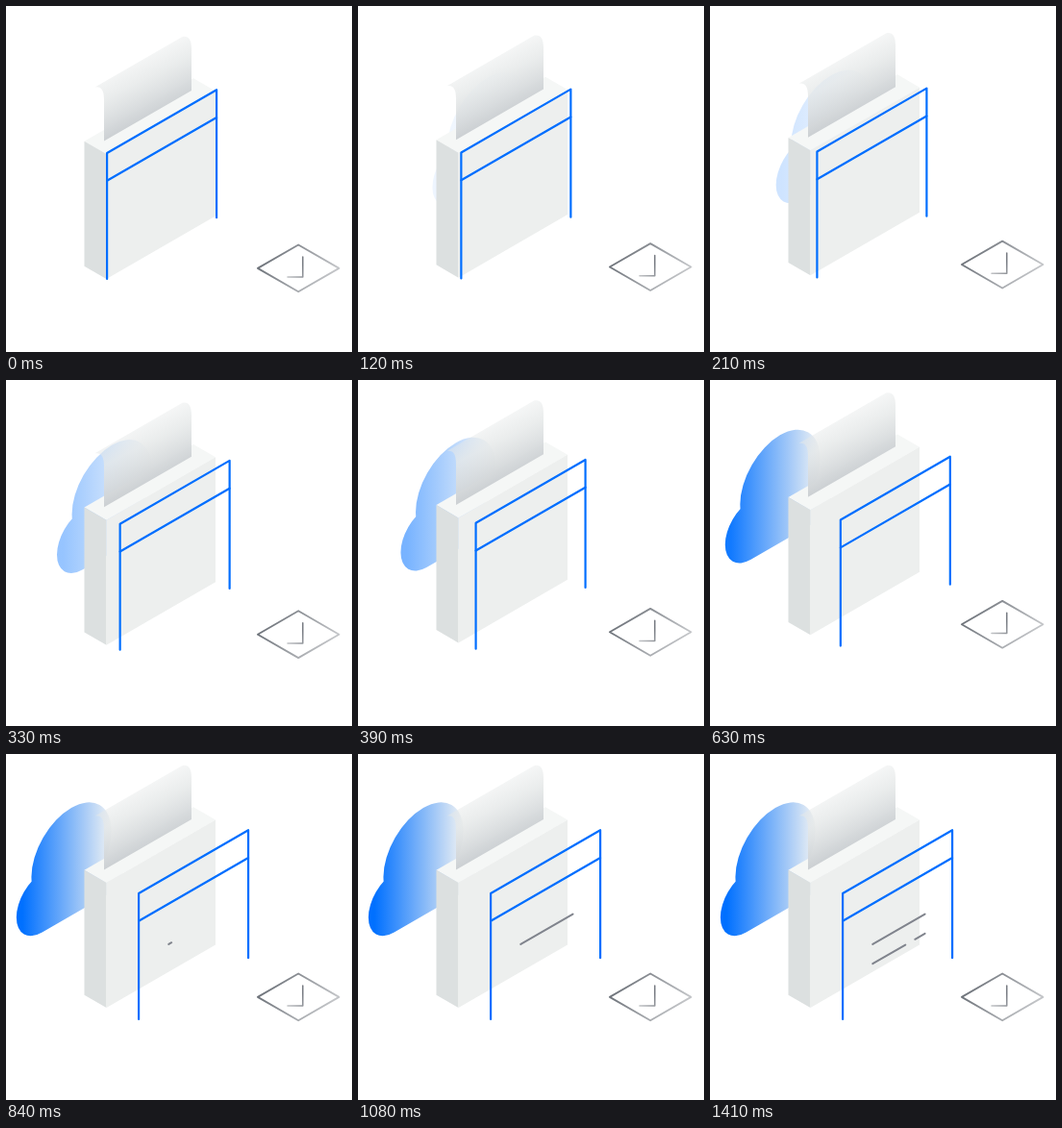
These frames come from a looping animation (360 px wide and 360 px high, 1500 ms). An HTML page with a canvas:

```html
<!DOCTYPE html>
<html lang="en">
<head>
<meta charset="utf-8">
<title>Isometric cloud</title>
<style>
  html, body { margin: 0; width: 100%; height: 100%; overflow: hidden; background: #fff; }
  canvas { display: block; width: 360px; height: 360px; }
</style>
</head>
<body>
<canvas id="stage"></canvas>
<script>
const SIZE = 360, LOOP = 1500, STEP = 30, LAST_STEP = 1410;
const SLOPE = 1 / Math.sqrt(3);
const LIFT = 20;
const BLUE = '#006eff';
const canvas = document.getElementById('stage');
const ctx = canvas.getContext('2d');
const ratio = window.devicePixelRatio || 1;
canvas.width = canvas.height = SIZE * ratio;

function ease(t, from, to) {
  const u = Math.min(1, Math.max(0, (t - from) / (to - from)));
  return u * u * (3 - 2 * u);
}

// Isometric offset: along the wall (up right), along the depth (down right), straight down.
function iso(wall, depth = 0, down = 0) {
  return [wall + depth, (depth - wall) * SLOPE + down];
}

function gradient(x0, y0, x1, y1, ...stops) {
  const g = ctx.createLinearGradient(x0, y0, x1, y1);
  stops.forEach(([at, color]) => g.addColorStop(at, color));
  return g;
}

function shifted(dx, dy, draw) {
  ctx.save();
  ctx.translate(dx, dy);
  draw();
  ctx.restore();
}

function trace(points, closed) {
  ctx.beginPath();
  points.forEach(([x, y]) => ctx.lineTo(x, y));
  if (closed) ctx.closePath();
}

function fillFace(color, ...points) {
  trace(points, true);
  ctx.fillStyle = color;
  ctx.fill();
}

function strokeLine(color, width, points, closed) {
  trace(points, closed);
  ctx.strokeStyle = color;
  ctx.lineWidth = width;
  ctx.stroke();
}

// Two circles and a flat base, laid onto the wall plane.
function drawCloud() {
  const big = 48, small = 31, x = -35, y = 33;
  ctx.save();
  ctx.transform(Math.cos(Math.PI / 6), -0.5, 0, 1, 68, 104);
  ctx.beginPath();
  ctx.arc(0, 0, big, 0, 2 * Math.PI);
  ctx.closePath();
  ctx.moveTo(x + small, y);
  ctx.arc(x, y, small, 0, 2 * Math.PI);
  ctx.closePath();
  ctx.rect(x, y, 2 * big, small);
  ctx.restore();
  ctx.fillStyle = gradient(17, 0, 109, 0, [0, '#0070ff'], [1, '#eef1f3']);
  ctx.fill();
}

function drawPaper() {
  const width = 91, rise = width * SLOPE;
  shifted(102, 120.5, () => {
    ctx.beginPath();
    ctx.moveTo(0, 0);
    ctx.lineTo(0, -43);
    ctx.bezierCurveTo(0, -53, -3, -57, -9.5, -56);
    ctx.lineTo(width - 9.5, -56 - rise);
    ctx.bezierCurveTo(width - 3, -57 - rise, width, -53 - rise, width, -43 - rise);
    ctx.lineTo(width, -rise);
    ctx.fillStyle = gradient(32, -82.5, 58, -31.5,
      [0, 'rgba(229,232,232,.4)'], [0.35, 'rgba(229,232,232,.8)'], [1, '#cdd1d4']);
    ctx.fill();
  });
}

function drawBox() {
  const width = 113.5, depth = -23, height = 130;
  shifted(104.5, 134, () => {
    fillFace('#f5f7f6', iso(0), iso(width), iso(width, depth), iso(0, depth));
    fillFace('#dce0e0', iso(0), iso(0, depth), iso(0, depth, height), iso(0, 0, height));
    fillFace('#edefee', iso(0), iso(width), iso(width, 0, height), iso(0, 0, height));
  });
}

function drawFrame() {
  const width = 114, bar = 28.8;
  shifted(138.1, 145, () => {
    strokeLine(BLUE, 2.2, [iso(0, 0, 131), iso(0), iso(width), iso(width, 0, 133)]);
    strokeLine(BLUE, 2.2, [iso(0, 0, bar), iso(width, 0, bar)]);
  });
}

function drawTile() {
  const half = 21.15;
  shifted(304.2, 252.9, () => {
    const rim = gradient(-29, -18, 28, 19, [0, '#70757c'], [1, '#c3c5c8']);
    strokeLine(rim, 1.8, [iso(half, half), iso(half, -half), iso(-half, -half), iso(-half, half)], true);
    const hook = gradient(5, -3, -11, 9, [0, '#777b82'], [1, '#bfc1c4']);
    strokeLine(hook, 1.5, [[4.6, -12], [4.6, 9.2], [-11.2, 9.2]]);
  });
}

// Reveals dashes one after another along a row of the wall.
function drawRow(y, progress, ...dashes) {
  let left = progress * dashes.reduce((sum, [from, to]) => sum + to - from, 0);
  shifted(169.3, y, () => {
    for (const [from, to] of dashes) {
      if (left <= 0) return;
      strokeLine('#80848d', 2, [iso(from), iso(Math.min(to, from + left))]);
      left -= to - from;
    }
  });
}

function render(t) {
  const move = ease(t, 0, 750);
  const rest = 1 - move;
  ctx.setTransform(ratio, 0, 0, ratio, 0, 0);
  ctx.fillStyle = '#fff';
  ctx.fillRect(0, 0, SIZE, SIZE);
  ctx.lineCap = ctx.lineJoin = 'round';

  ctx.globalAlpha = move;
  shifted(71.5 * rest, LIFT * rest, drawCloud);
  ctx.globalAlpha = 1;

  shifted(0, LIFT * rest, () => {
    drawBox();
    drawPaper();
    drawTile();
  });
  shifted(-33 * rest, 8 * rest, drawFrame);

  drawRow(197.9, ease(t, 800, 1085), [0, 54.3]);
  drawRow(218.2, ease(t, 1235, 1410), [0, 34], [44, 54.3]);
}

const start = performance.now();
function tick() {
  const t = (performance.now() - start) % LOOP;
  render(Math.min(LAST_STEP, Math.floor(t / STEP) * STEP));
  requestAnimationFrame(tick);
}
tick();
</script>
</body>
</html>
```
